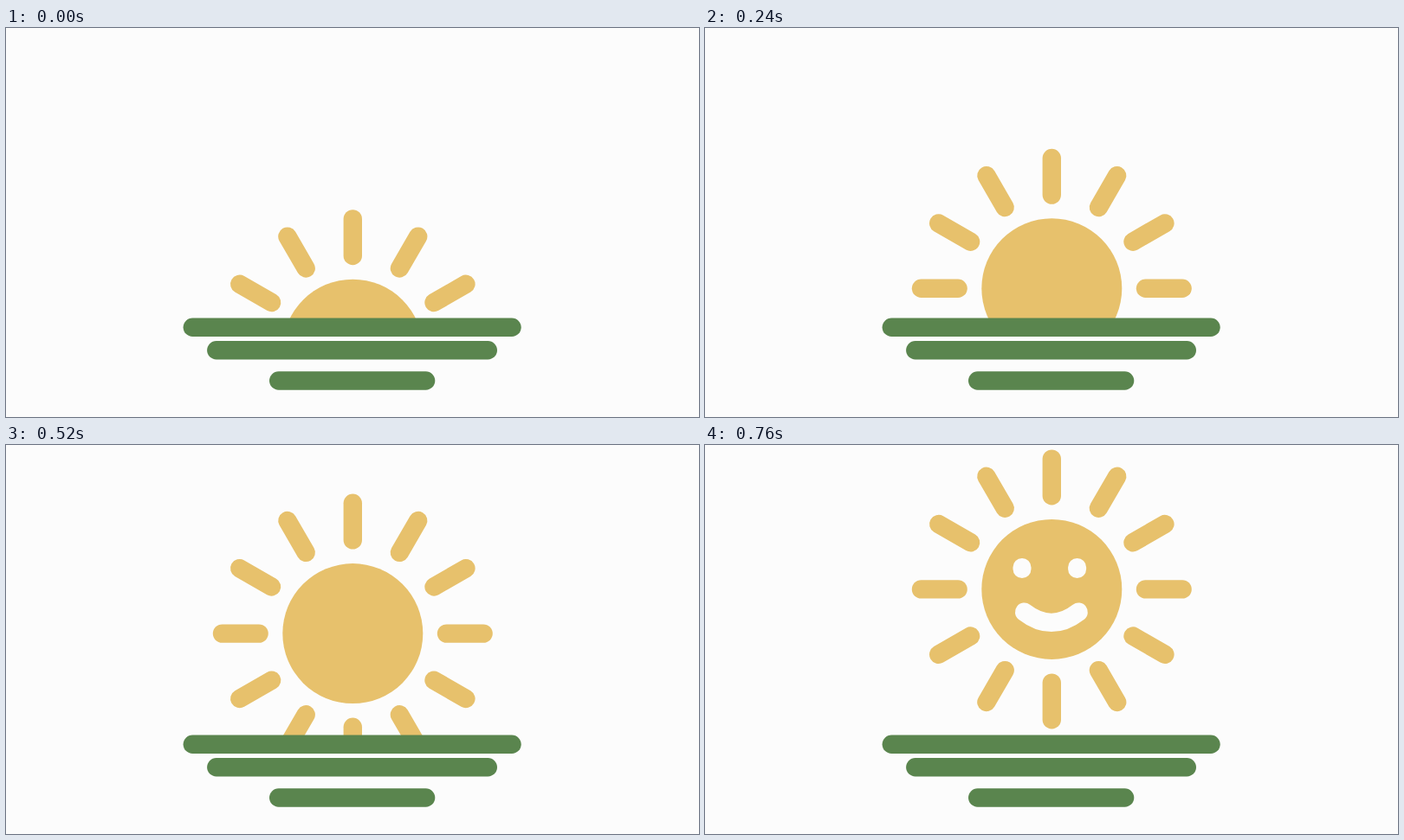
An HTML page that plays this animation: 800 px wide and 450 px high, repeating every 2000 ms.

```html
<!DOCTYPE html>
<html lang="en">
<head>
<meta charset="utf-8">
<title>Sunrise</title>
<style>
  html, body { margin: 0; width: 100%; height: 100%; overflow: hidden; background: #fcfcfc; }
  svg { display: block; width: 100vw; height: 100vh; }
  line, path { stroke-width: 21.4; stroke-linecap: round; fill: none; }
</style>
</head>
<body>
<svg viewBox="0 0 800 450">
  <clipPath id="sky"><rect width="800" height="340"/></clipPath>
  <g clip-path="url(#sky)">
    <g id="sun" stroke="#e7c16c">
      <circle r="81" fill="#e7c16c" stroke="none"/>
      <g id="rays"></g>
      <g id="face" stroke="#fcfcfc">
        <g fill="#fcfcfc" stroke="none">
          <rect x="-44.8" y="-35.9" width="21" height="23" rx="10.5"/>
          <rect x="18.8" y="-35.9" width="21" height="23" rx="10.5"/>
        </g>
        <path d="M-31.7 26.3Q-.4 50.6 30.9 26.3"/>
      </g>
    </g>
  </g>
  <g stroke="#5a854e">
    <line x1="215.3" x2="584" y1="346.3" y2="346.3"/>
    <line x1="242.8" x2="556.3" y1="372.8" y2="372.8"/>
    <line x1="314.7" x2="484.6" y1="408" y2="408"/>
  </g>
</svg>
<script>
  const LOOP = 2000, TICK = 40, STEPS = 32, STEP_MS = 21.4, STEP_PX = 6.4;
  const sun = document.getElementById('sun');
  const face = document.getElementById('face');

  document.getElementById('rays').innerHTML = Array.from({ length: 12 }, (_, i) =>
    `<line x1="108.2" x2="150.8" transform="rotate(${i * 30})"/>`).join('');

  // The sun climbs in whole steps, pauses, then the face appears.
  function draw(now) {
    const t = Math.floor(now % LOOP / TICK) * TICK;
    const step = Math.min(STEPS, Math.round(t / STEP_MS));
    const y = 166.9 + (STEPS - step) * STEP_PX;
    sun.setAttribute('transform', `translate(400.3 ${y})`);
    face.style.display = t < 760 ? 'none' : '';
  }

  const start = performance.now();
  function loop() {
    draw(performance.now() - start);
    requestAnimationFrame(loop);
  }
  loop();
</script>
</body>
</html>
```
